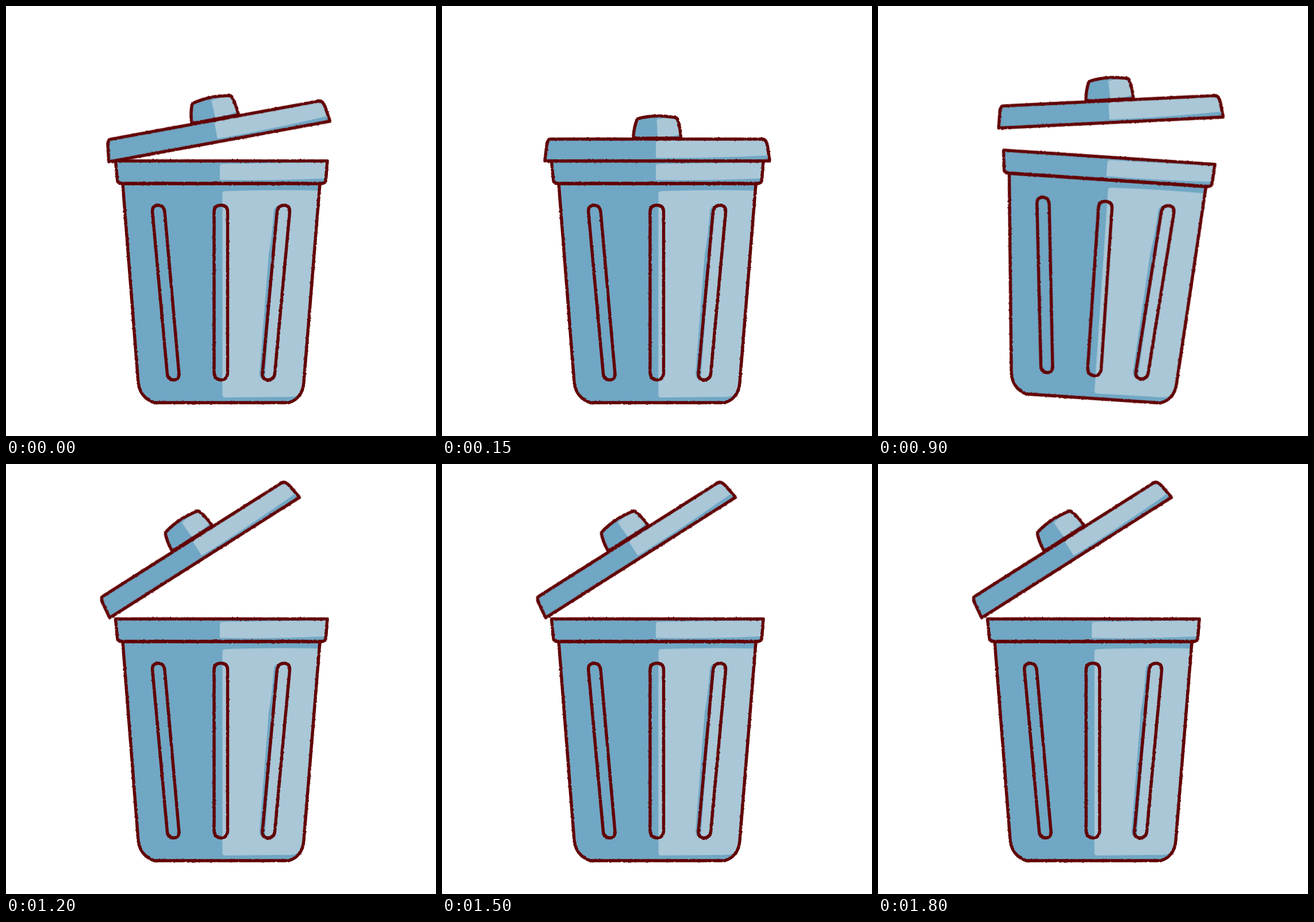
Animation, 748 px wide and 748 px high, one loop 1.95 s. Source, as an HTML page:

```html
<!DOCTYPE html>
<html lang="en">
<head>
<meta charset="utf-8">
<title>Trash can</title>
<style>
  html, body { margin: 0; width: 100%; height: 100%; overflow: hidden; background: #fff; }
  svg { display: block; width: 100vw; height: 100vh; }

  .base { fill: #70a7c4; }
  .light { fill: #a9c7d7; }
  .ink {
    fill: none;
    stroke: #620003;
    stroke-width: 5.4;
    stroke-linejoin: round;
    stroke-linecap: round;
    filter: url(#rough);
  }

  #can, #lid { animation: 1950ms step-end infinite; }
  #can { animation-name: wobble; }
  #lid { animation-name: flip; transform-origin: 179px 269.5px; }

  @keyframes wobble {
    0%        { transform-origin: 0 0; transform: none; }
    46.1538%  { transform-origin: 491px 690px; transform: translate(-1px, 0.5px) rotate(3.85deg); }
    53.8462%  { transform-origin: 257px 690px; transform: translate(2px, 1.2px) rotate(-4.95deg); }
    61.5385%, 100% { transform-origin: 0 0; transform: none; }
  }
  @keyframes flip {
    0%        { transform: translate(0, 1.5px) rotate(-10.4deg); }
    7.6923%   { transform: none; }
    46.1538%  { transform: translate(31px, -57.2px) rotate(-2.8deg); }
    53.8462%  { transform: translate(-25.5px, 10.5px) rotate(-27.1deg); }
    61.5385%, 100% { transform: translate(1.5px, -2px) rotate(-32.4deg); }
  }
</style>
</head>
<body>
<svg viewBox="0 0 748 748">
  <defs>
    <!-- slightly uneven pen edge -->
    <filter id="rough" filterUnits="userSpaceOnUse" x="150" y="170" width="450" height="540" color-interpolation-filters="sRGB">
      <feTurbulence type="fractalNoise" baseFrequency="0.25" numOctaves="2" seed="4"/>
      <feDisplacementMap in="SourceGraphic" scale="2.6" xChannelSelector="R" yChannelSelector="G"/>
    </filter>
    <path id="body" d="M203 309 L230 655 Q233 681 258 690 H492 Q516 682 518 655 L546 309 Z"/>
    <path id="rim" d="M190.500 269.500 H559 L556.500 301 Q556 308 551 308.500 H198 Q194 308 193.500 301 Z"/>
    <path id="plate" d="M179 269.500 L182 243 Q183 231.500 190 231.500 H558 Q564 232 566 243 L570 269.500 Z"/>
    <path id="knob" d="M332.500 230 Q334 209 340 196 Q374 187 409 195 Q415 212 415.500 230 Z"/>
  </defs>

  <g id="can">
    <use href="#body" class="base"/>
    <use href="#rim" class="base"/>
    <path class="light" d="M376.500 327 Q376.500 322 382 322 Q460 319 545 321 L518 655 Q517 670 509 677 Q498 681 480 680 L381 681 Q376.500 681 376.500 676 Z"/>
    <path class="light" d="M372 279 Q372 274.500 377 274.500 L557 272 L554 300 Q465 304 372 302.500 Z"/>
    <path class="base" d="M480 346 Q467 347 466 356 Q463 400 457 432 L441 639 Q441 650 450 650 L472 358 Z"/>
    <g class="ink">
      <use href="#body"/>
      <use href="#rim"/>
      <path d="M254.700 358 Q254 347 264.500 346.500 Q275 347 276 358 L301 640 Q301 650 292 650.500 Q282 650 280.500 640 Z"/>
      <path d="M362 358 Q362 346.500 374 346.500 Q385.500 346.500 385.500 358 V638 Q385 650 374 650.500 Q363 650 362 638 Z"/>
      <path d="M471.500 358 Q473 347 484 346.500 Q494 347 493.500 358 L467.500 640 Q466 650 456 650.500 Q446 650 446 640 Z"/>
    </g>
  </g>

  <g id="lid">
    <use href="#knob" class="base"/>
    <use href="#plate" class="base"/>
    <path class="light" d="M373.500 197 Q391 193 406 196 Q412 211 413 224 Q394 228 375 228 Z"/>
    <path class="light" d="M372 234 H556 Q562 235 564 244 L567 260 Q470 265 372 264 Z"/>
    <g class="ink">
      <use href="#knob"/>
      <use href="#plate"/>
    </g>
  </g>
</svg>
</body>
</html>
```
